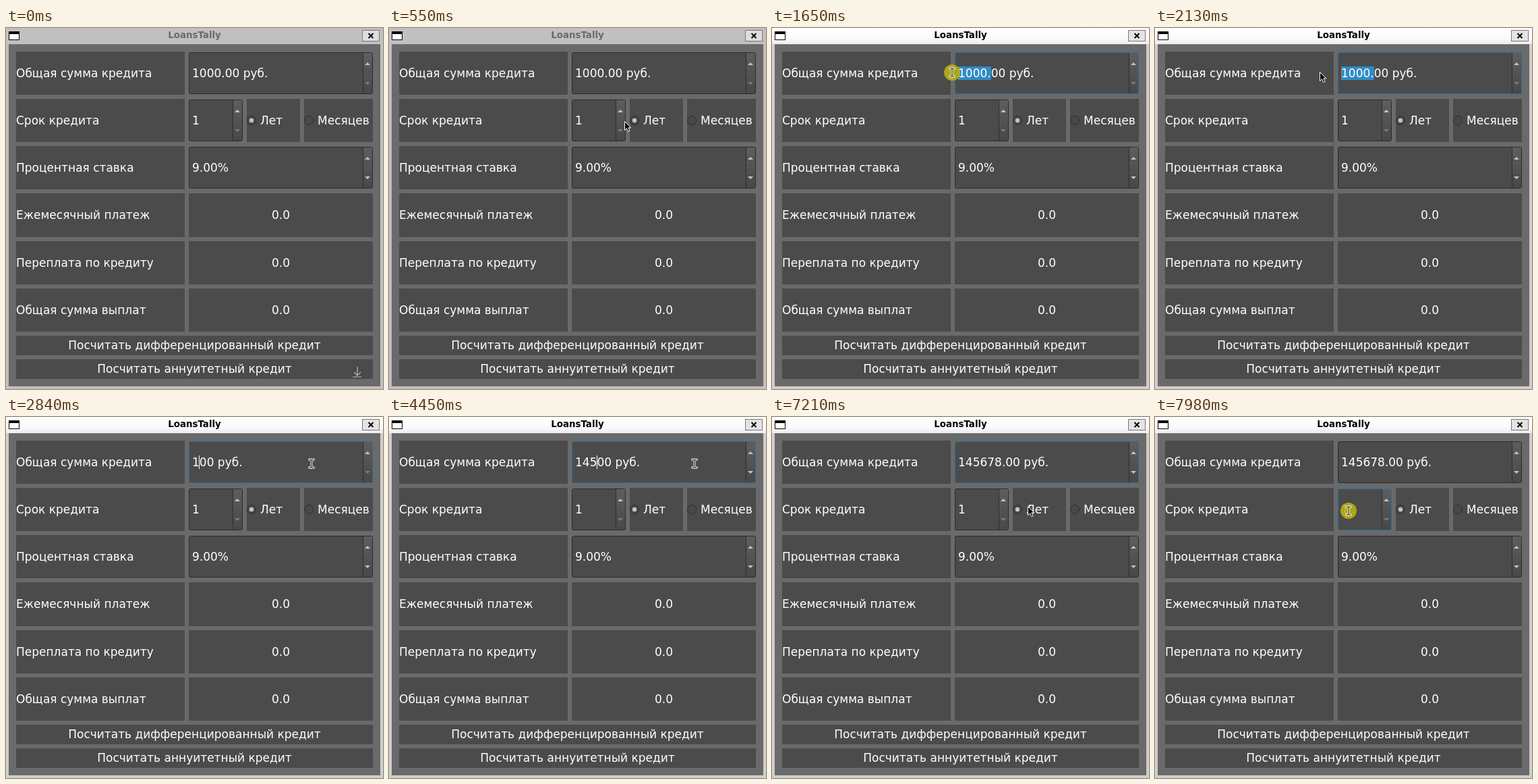
An HTML page for the animation above (8000 ms loop, 559 by 535 pixels).

```html
<!DOCTYPE html>
<html lang="ru">
<head>
<meta charset="utf-8">
<title>LoansTally</title>
<style>
  html, body { margin: 0; width: 100%; height: 100%; overflow: hidden; background: #d0d0d0; }
  svg { display: block; }
  text { font: 17px "DejaVu Sans", sans-serif; fill: #fff; white-space: pre; }
  .mid { text-anchor: middle; }
  #title { font-size: 13.4px; font-weight: bold; }
  .cell { fill: #4b4b4b; }
  .spin { fill: #4b4b4b; stroke: #2b2b2b; }
  .spin.focus { stroke: #266f9f; }
  .arrow { fill: #c4c4c4; }
  .arrow.off { fill: #7c7c7c; }
</style>
</head>
<body>
<svg id="stage" width="559" height="535" viewBox="0 0 559 535">
  <defs>
    <linearGradient id="btn" x2="0" y2="1">
      <stop stop-color="#5e5e5e"/><stop offset="1" stop-color="#484848"/>
    </linearGradient>
    <linearGradient id="bar" x2="0" y2="1">
      <stop stop-color="#fff"/><stop offset=".6" stop-color="#fbfbfb"/><stop offset="1" stop-color="#ececec"/>
    </linearGradient>
  </defs>
  <rect id="frame" width="559" height="535"/>
  <rect id="head" width="559" height="24"/>
  <rect x="4" y="24" width="551" height="507" fill="#6a6a6a"/>
  <rect x="4.5" y="5.5" width="15" height="12" fill="#fff" stroke="#000"/>
  <rect x="4" y="5" width="16" height="4"/>
  <rect id="close" x="528.5" y="3.5" width="25" height="16" stroke="#777"/>
  <path d="M537.5 8l7 7m0 -7l-7 7" stroke="#000" stroke-width="2"/>
  <text id="title" class="mid" x="279.5" y="15">LoansTally</text>
  <g id="form"></g>
  <g id="pointer">
    <circle id="press" r="12" fill="#b8b010" fill-opacity=".9"/>
    <g id="edge">
      <circle r="10" cx="1" cy="1" fill="#444" fill-opacity=".35"/>
      <path d="M0 -8V5m-5 -5l5 5l5 -5M-7 7H6" fill="none" stroke="#bcbcbc" stroke-width="1.2"/>
    </g>
    <path id="tip" d="M.5 .5V13.5L3.5 10.7L5.7 15.5L8 14.5L5.9 9.8H9.8Z" fill="#000" stroke="#fff"/>
    <g id="beam" fill="none" stroke-linecap="square">
      <path d="M-3 -6H-1L0 -5L1 -6H3M0 -5V5M-3 6H-1L0 5L1 6H3" stroke="#fff" stroke-width="3"/>
      <path d="M-3 -6H-1L0 -5L1 -6H3M0 -5V5M-3 6H-1L0 5L1 6H3" stroke="#000" stroke-width="1"/>
    </g>
  </g>
</svg>
<script>
const LOOP = 8000;
const $ = id => document.getElementById(id);

const rect = (x, y, w, h, extra = 'class="cell"') =>
  `<rect x="${x}" y="${y}" width="${w}" height="${h}" ${extra}/>`;
const text = (x, y, s, extra = '') => `<text x="${x}" y="${y}" ${extra}>${s}</text>`;
const spin = (id, x, y, w, inner) => {
  const r = x + w, c = r - 8;
  return rect(x + .5, y + .5, w - 1, 61, `rx="2" class="spin" id="${id}"`) +
    rect(r - 14, y + 1, 13, 60, 'fill="url(#btn)"') +
    rect(r - 15, y + 1, 1, 60, 'fill="#2f2f2f"') +
    `<path class="arrow" d="M${c - 4} ${y + 19}h8l-4 -4z"/>` +
    `<path class="arrow" id="${id}Down" d="M${c - 4} ${y + 44}h8l-4 4z"/>` + inner;
};
const radio = (x, w, label, on) =>
  rect(x, 105, w, 64) +
  `<circle cx="${x + 7}" cy="137" r="6.5" fill="#484848" stroke="#2d2d2d"/>` +
  (on ? `<circle cx="${x + 7}" cy="137" r="3.2" fill="#c4c4c4"/>` : '') +
  text(x + 20, 143, label);

const labels = [
  ['Общая сумма кредита', 35, 64], ['Срок кредита', 105, 64], ['Процентная ставка', 175, 64],
  ['Ежемесячный платеж', 245, 65], ['Переплата по кредиту', 316, 64], ['Общая сумма выплат', 386, 64]
];
const buttons = [['Посчитать дифференцированный кредит', 456], ['Посчитать аннуитетный кредит', 491]];

$('form').innerHTML =
  labels.map(([s, y, h], i) => rect(15, y, 250, h) + text(15, y + 38, s) +
    (i > 2 ? rect(271, y, 273, h) + text(407.5, y + 38, '0.0', 'class="mid"') : '')).join('') +
  buttons.map(([s, y]) => rect(15, y, 529, 29) + text(279.5, y + 20, s, 'class="mid"')).join('') +
  spin('sum', 271, 36, 273, rect(276, 57, 0, 20, 'id="mark" fill="#308cc6"') + text(276, 73, '', 'id="amount"')) +
  spin('term', 271, 106, 80, text(276, 143, '1')) +
  spin('rate', 271, 176, 273, text(276, 213, '9.00%')) +
  radio(357, 79, 'Лет', true) + radio(442, 102, 'Месяцев', false) +
  rect(0, 57, 1, 20, 'id="caret"');
$('termDown').classList.add('off');

// time, x, y of the pointer
const path = [
  [0, 521, 510], [20, 521, 510], [180, 486, 430], [400, 402, 245], [600, 332, 103], [770, 313, 69],
  [1170, 313, 69], [1300, 322, 69], [1550, 284, 67], [1790, 244, 65], [2390, 244, 65],
  [2590, 345, 62], [2810, 453, 69], [6470, 453, 69], [6490, 445, 69], [6800, 418, 88],
  [7050, 388, 122], [7200, 379, 132], [7300, 379, 132], [7450, 342, 138], [7610, 306, 140],
  [7740, 306, 140], [7850, 287, 139], [LOOP, 287, 139]
];
// time, typed digits before the caret
const typing = [[0, '1000.'], [2840, '1'], [4050, '14'], [4450, '145'], [4950, '1456'],
  [5210, '14567'], [5450, '145678'], [5940, '145678.']];
// spans in which the caret is hidden
const blink = [[0, 890], [3440, 3940], [6700, 7300]];

const within = (t, a, b) => t >= a && t < b;
const show = (id, on) => $(id).setAttribute('visibility', on ? 'visible' : 'hidden');
const set = (id, name, value) => $(id).setAttribute(name, value);
const edgeX = s => 276 + [...s].reduce((w, c) => w + (c === '.' ? 5.4 : 10.82), 0);

function pointerAt(t) {
  const i = Math.max(1, path.findIndex(k => k[0] > t));
  const [t0, x0, y0] = path[i - 1], [t1, x1, y1] = path[i];
  const k = (t - t0) / (t1 - t0);
  return [Math.round(x0 + (x1 - x0) * k), Math.round(y0 + (y1 - y0) * k)];
}

function selectionStart(x) {
  const stops = ['', '1', '10', '100', '1000', '1000.'].map(edgeX);
  return stops.reduce((a, b) => Math.abs(b - x) < Math.abs(a - x) ? b : a);
}

function draw(t) {
  const [x, y] = pointerAt(t);
  const active = t >= 890, onTerm = t >= 7900;
  const drag = within(t, 890, 1980);

  set('frame', 'fill', active ? '#cfcfcf' : '#c0c0c0');
  set('head', 'fill', active ? 'url(#bar)' : '#c0c0c0');
  set('close', 'fill', active ? '#e4e4e4' : '#dedede');
  $('title').style.fill = active ? '#000' : '#6a6a6a';
  $('sum').classList.toggle('focus', active && !onTerm);
  $('term').classList.toggle('focus', onTerm);
  $('sumDown').classList.toggle('off', t < 4050);

  const typed = typing.filter(k => k[0] <= t).pop()[1];
  $('amount').textContent = typed + '00 руб.';

  const selecting = within(t, 1300, 2840);
  const from = selecting ? selectionStart(x > 325 || t > 1790 ? 244 : x) : 325;
  set('mark', 'x', from);
  set('mark', 'width', selecting ? Math.max(0, 325 - from) : 0);

  const caretX = onTerm ? 287 : selecting ? from : t < 1300 ? 308 : edgeX(typed);
  set('caret', 'x', Math.floor(caretX));
  set('caret', 'y', onTerm ? 127 : 57);
  set('caret', 'fill', selecting && from < 325 ? '#cf7339' : '#fff');
  show('caret', !blink.some(([a, b]) => within(t, a, b)));

  const inField = (within(x, 271, 529) && within(y, 36, 98)) ||
    (within(x, 271, 336) && within(y, 106, 168)) ||
    (within(x, 271, 529) && within(y, 176, 238));
  const beam = inField || drag;
  set('pointer', 'transform', `translate(${x} ${y})`);
  show('press', drag || onTerm);
  show('edge', t < 20);
  show('beam', t >= 20 && beam);
  show('tip', t >= 20 && !beam);
}

const start = performance.now();
function tick(now) {
  draw(Math.max(0, now - start) % LOOP);
  requestAnimationFrame(tick);
}
draw(0);
requestAnimationFrame(tick);
</script>
</body>
</html>
```
